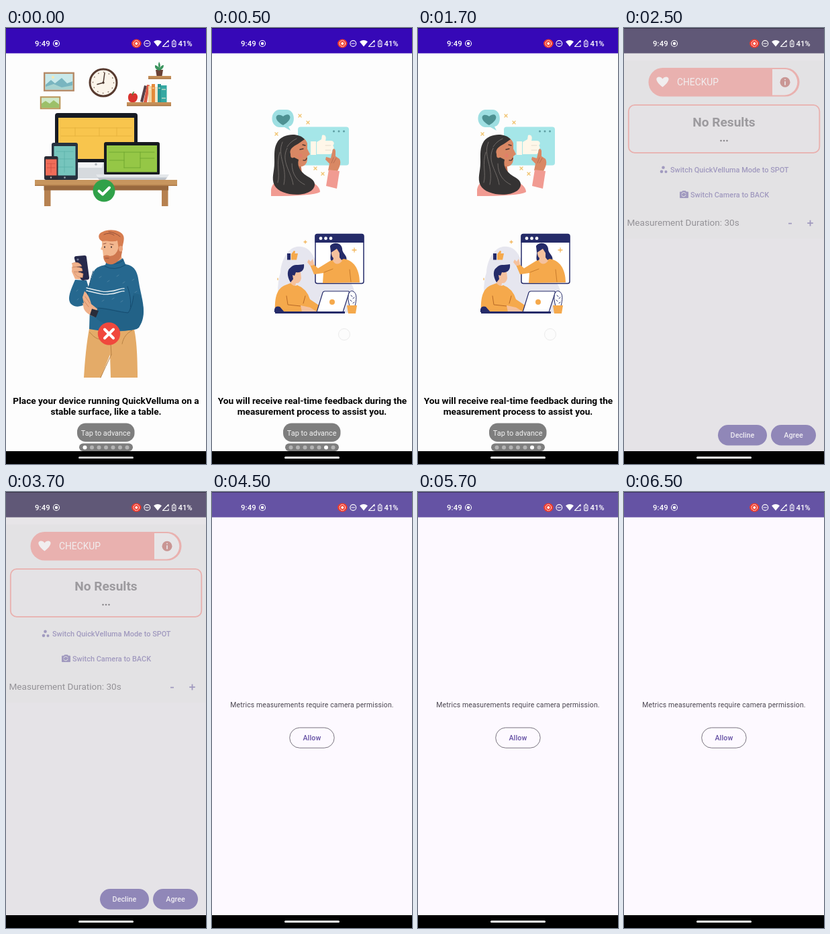
Recreate the animation shown at these times as an HTML page. Size 298 by 646 pixels, loop 8 s.

```html
<!DOCTYPE html>
<html lang="en">
<head>
<meta charset="utf-8">
<title>App walkthrough</title>
<style>
html, body { margin: 0; width: 100%; height: 100%; overflow: hidden; background: #000; }
svg { display: block; width: 100vw; height: 100vh; }
text { font-family: Roboto, Arial, sans-serif; }
.mid { text-anchor: middle; }
.bold { font-weight: 700; }
.medium { font-weight: 500; }
.caption text { font-size: 13.7px; font-weight: 700; text-anchor: middle; }
.line { fill: none; stroke-linecap: round; stroke-linejoin: round; }
</style>
</head>
<body>
<svg viewBox="0 0 298 646" preserveAspectRatio="none">
<rect width="298" height="646"/>
<rect id="page" y="37" width="298" height="590"/>

<g id="posture">
  <!-- wall -->
  <rect x="57.2" y="66.7" width="43.500" height="26" fill="#c9e9ea" stroke="#b58a67" stroke-width="2.400"/>
  <path d="M59 91V84l8-7 6 5 10-8 8 8 8-3v12z" fill="#79b5c0"/>
  <path d="M59 91v-4l12-4 12 5 16-3v6z" fill="#a8d3d0"/>
  <circle cx="70" cy="73" r="2" fill="#f7e8b0"/>
  <rect x="51.800" y="102.300" width="28.500" height="17" fill="#cfe8c8" stroke="#b99455" stroke-width="2"/>
  <path d="M53 118v-6l6-4 6 4 6-5 8 6v5z" fill="#9cc069"/>
  <circle cx="145" cy="81" r="20" fill="#fbf4ea" stroke="#573a2f" stroke-width="3"/>
  <circle cx="145" cy="81" r="15.500" class="line" stroke="#8a7568" stroke-width="1.500" stroke-dasharray=".5 7.615"/>
  <path d="M147 66.500L145 81l-9 2.500" class="line" stroke="#49352d" stroke-width="1.500"/>
  <circle cx="145" cy="81" r="1.700" fill="#49352d"/>
  <!-- shelves -->
  <path d="M212 71h34v4.500h-34zM180 110h66v5.500h-66z" fill="#c48f58"/>
  <path d="M212 74h34v1.500h-34zM180 114h66v1.500h-66z" fill="#a87443"/>
  <path d="M223 62h11l-1.500 9h-8z" fill="#6a4237"/>
  <path d="M228 63q-7-2-6-8 5 1 6 5-2-5 0-10 3 4 1 10 2-5 6-5 0 6-7 8" fill="#39935c"/>
  <path d="M188.500 98c4-3 8 0 7.500 5-.5 4-3 7-5 7h-4c-3 0-5-3-5-7 0-5 3-8 6.500-5" fill="#d9342f"/>
  <path d="M188.500 99q0-3 2-4" class="line" stroke="#4d7b35" stroke-width="1.500"/>
  <path d="M200 109l6-24 4 1-6 24z" fill="#574047"/>
  <path d="M205 110l5-26 4 .5-4 25.500z" fill="#dd5a43"/>
  <path d="M212 86h5v24h-5z" fill="#f0d6a5"/>
  <path d="M217 83h5v27h-5z" fill="#e58a3a"/>
  <path d="M222 87h4v23h-4z" fill="#f4e5c6"/>
  <path d="M226 83h5v27h-5z" fill="#2c9693"/>
  <path d="M231 85h8.500v25h-8.500z" fill="#35a8a2"/>
  <path d="M213 91h3M218 89h3M227 89h3M232 91h6M232 104h6" stroke="#fff2d8"/>
  <!-- monitor -->
  <path d="M107 196h40l2 27h-45z" fill="#d6dade"/>
  <path d="M108 199h37l-2 8h-35z" fill="#f2f3f5"/>
  <circle cx="134" cy="202" r="1.800" fill="#aeb4b9"/>
  <rect x="73" y="126" width="123" height="73" rx="4" fill="#171b24"/>
  <rect x="78" y="133" width="113" height="61" fill="#f8c54d"/>
  <path d="M82 148h105M103 148v12M139 148v12M165 148v12M82 160h105" class="line" stroke="#e3af3c" stroke-width=".8"/>
  <!-- tablet and phone -->
  <rect x="68" y="170" width="39" height="55" rx="3" fill="#263240"/>
  <rect x="71.500" y="175" width="32" height="43.500" fill="#76c5bd"/>
  <path d="M75 183h25M75 194h25M87 183v31M75 206h25" class="line" stroke="#5bb0a9" stroke-width=".8"/>
  <circle cx="87.500" cy="221.600" r="1.300" fill="#99a2a8"/>
  <rect x="57" y="190" width="20.500" height="35" rx="2.500" fill="#2b2b35"/>
  <rect x="59" y="194.500" width="16.500" height="24" fill="#f06d59"/>
  <path d="M61 201h12M61 207h12M67 201v13" class="line" stroke="#cf4f43" stroke-width=".8"/>
  <circle cx="67" cy="221.500" r="1.200" fill="#aaa"/>
  <!-- laptop -->
  <rect x="146" y="169" width="83" height="49" rx="3" fill="#171b20"/>
  <rect x="150" y="174" width="75" height="39.500" fill="#95c746"/>
  <path d="M154 184h67M176 184v23M200 184v23M154 196h22M200 193h21M176 207h24" class="line" stroke="#6ea52f" stroke-width=".9"/>
  <path d="M134 217h109l-5 8h-99z" fill="#e4e7ea"/>
  <path d="M136 221.500h104l-3 3.500h-98z" fill="#bec3c9"/>
  <!-- desk -->
  <path d="M57 234h9.500v30h-9.500zM232 234h9.500v30h-9.500z" fill="#b68150"/>
  <path d="M56.500 234h185.500v6.500h-185.500z" fill="#98683e"/>
  <path d="M43 225h212v9h-212z" fill="#c7955e"/>
  <path d="M43 232.500h212v1.500h-212z" fill="#ad7a48"/>
  <circle cx="146" cy="241" r="16.500" fill="#30a149"/>
  <path d="M138.500 241.500l5.500 5 10-10" class="line" stroke="#fff" stroke-width="4"/>

  <!-- person holding a phone -->
  <path d="M126 436h62c5 14 8 35 8 82h-40l-1-34-14 34h-25c2-32 5-60 10-82z" fill="#e4ab68"/>
  <path d="M157 484l-2-34M157 484c-6 12-11 23-16 34M125 451c5 6 9 9 14 10M188 448c-8 4-13 10-15 20" class="line" stroke="#b88144"/>
  <path d="M151 334h20l4 18-13 8-13-7z" fill="#e7a37c"/>
  <path d="M150 345q12 6 24-4l4 9c13 2 18 10 20 27 2 14 7 28 7 43 0 12-4 21-10 26q-34 7-71 0l1-32-6-6c-7 6-17 6-22 1-6-7-2-18 6-36l17 1 3 10 7-22q4-9 18-11z" fill="#26688f"/>
  <path d="M130 360c-4 12-8 28-11 48M123 384c-2 12-3 18-4 24M181 383c5 14 6 28 3 39M151 347q13 6 24-3M147 353q15 8 31-2" class="line" stroke="#164c70"/>
  <path d="M120 385c16 4 25 7 35 5 10 0 15-5 21-4M120 389c16 4 25 7 35 5 10 0 15-5 21-4" class="line" stroke="#e5edf0" stroke-width="1.400"/>
  <path d="M139 370l3-2M151 376l3-2M165 368l3-2M174 378l3-2M143 405l3-2M158 402l3-2M171 406l3-2M188 374l3-2M192 392l3-2M188 411l3-2M105 390l2-2M106 403l2-2" class="line" stroke="#5b8daa" stroke-width=".7"/>
  <path d="M137 414c16 0 31 6 45 7 5-8 7-17 8-28l10 2c7 20 6 35-2 49-15 9-42 2-63-13z" fill="#226287"/>
  <path d="M137 415c17 1 31 6 45 7 5-7 7-16 8-25" class="line" stroke="#164c70"/>
  <path d="M117 390c5 4 8 11 10 19l9 7-3 12c-8-2-14-6-17-12l-2-9 2 1-2-9z" fill="#efb08a"/>
  <path d="M116 404l7 9M118 398l7 10" class="line" stroke="#c67e59" stroke-width=".8"/>
  <path d="M128 416l10 3-4 10-9-4z" fill="#292c3a"/>
  <path d="M99 349c6-2 13 0 20 5l4 10-3 9-17-1-5-11z" fill="#f0b28c"/>
  <path d="M105 338l12-1q3 0 3 3l4 30q0 3-3 3l-6 1q-3 0-4-3l-9-29q-1-4 3-4z" fill="#26294b"/>
  <circle cx="107" cy="343" r="1.600" fill="#777e9a"/>
  <path d="M98 349q8-4 13 1l2 3-13 1M98 355q10-2 15 1l1 4-13 1M101 362q9-1 14 2l-1 6q-8 0-12-7" fill="#f0b28c" stroke="#c98662" stroke-width=".6"/>
  <path d="M143 314c4-5 23-5 28 2l1 16q-4 10-11 14l-8 2q-8-1-8-10l-1-9-3-1 2-5z" fill="#f2b78f"/>
  <path d="M168 325l5 1q1 13-7 20-5 5-12 4-8-1-9-12 5-3 10 0 9 0 13-13z" fill="#cf784f"/>
  <path d="M143 316c-7-4-6-12 1-14 9-5 28-3 31 6 2 5-1 12-2 20h-5l-2-13c-7 3-16-1-23 1z" fill="#d77d50"/>
  <ellipse cx="171" cy="327" rx="3" ry="4.300" fill="#eba47d"/>
  <path d="M145 320l4-1M155 320l5 1M148 341h5M146 306q8-4 15 1M153 302q10 1 17 7" class="line" stroke="#8c4b38" stroke-width=".9"/>
  <path d="M147 324v1M157 324v1" class="line" stroke="#392d31" stroke-width="1.700"/>
  <circle cx="153.500" cy="453" r="16.700" fill="#f0483d"/>
  <path d="M147 446.500l13 13m0-13l-13 13" class="line" stroke="#fff" stroke-width="4"/>
  <g class="caption"><text x="149" y="556.700">Place your device running QuickVelluma on a</text><text x="149" y="572.700">stable surface, like a table.</text></g>
</g>

<g id="feedback">
  <!-- gesture card -->
  <rect x="128" y="146.500" width="76" height="57" rx="4" fill="#a5e6e8"/>
  <g fill="#5f9fa4"><circle cx="181.500" cy="153" r="1.500"/><circle cx="189" cy="153" r="1.500"/><circle cx="196.500" cy="153" r="1.500"/></g>
  <path d="M100 121h11c14 0 14 24 3 25l3 6-9-5h-8c-14-2-14-24 0-26z" fill="#9edfe2"/>
  <path d="M106 144c-18-10-9-20 0-13 9-8 18 3 0 13z" fill="#4d9192"/>
  <path d="M88 249v-10c2-10 10-14 20-16h30c14 5 23 12 23 20q-11 6-73 6z" fill="#f19b92"/>
  <path d="M119 198h13l3 28q-10 9-20 0z" fill="#bd6b4e"/>
  <path d="M116 168c9-10 23-8 26 3v8l4 8-4 3c1 11-4 16-12 15-9 0-14-8-14-22z" fill="#d98864"/>
  <path d="M138 165c-10-11-32-8-40 3-6 9-5 19-5 31 0 15-5 23 0 34 8 15 41 18 55 8 8-7 6-14-2-19-13-7-20-16-17-27l-10-5c-6-8 0-13 5-16 6-3 9-6 14-9z" fill="#353333"/>
  <path d="M105 169c-9 21 8 35 2 63M112 178c-10 20 6 34 9 54M101 184c-6 18 1 31-3 45M119 201c0 17 9 26 19 31M126 164q-9 4-14 12" class="line" stroke="#77716e" stroke-width=".9"/>
  <path d="M131 180l5-1M139 174l-4-1M136 196q4 1 5-3" class="line" stroke="#493530" stroke-width="1.300"/>
  <circle cx="132" cy="189" r="2.700" fill="#e17f69"/>
  <ellipse cx="120" cy="188" rx="3" ry="4.500" fill="#d98864"/>
  <path d="M147 168h8v20h-8zM156 169l7-4 1-6c5-2 7 3 5 8h8c5 0 6 5 3 7 3 3 1 6-1 7 1 4-1 6-4 6h-19z" fill="#fff7e9"/>
  <path d="M169 174h8M169 181h8" class="line" stroke="#e4dbcb"/>
  <path d="M173 211l2-10-6-6 1-4 7 2 3-13q3-3 4 2v8l6 4c3 6 0 12-3 18z" fill="#d98864"/>
  <path d="M181 192l-3 8M185 193l-4 7" class="line" stroke="#a96249" stroke-width=".7"/>
  <path d="M174 210l16 2-4 26-16-4z" fill="#f19b92"/>
  <path d="M129 128l4 4m0-4l-4 4M141 138l4 4m0-4l-4 4M94 155l4 4m0-4l-4 4M152 206l4 4m0-4l-4 4M163 214l4 4m0-4l-4 4" class="line" stroke="#f1c472" stroke-width="1.400"/>

  <!-- video call -->
  <path d="M106 422c-9-18-10-42-4-60 1-18 12-41 31-38 20 3 16 23 34 31 21 9 45 17 45 38 0 15-1 24-5 29z" fill="#e6e6ef"/>
  <rect x="154" y="305.500" width="72" height="73" rx="3" fill="#fff" stroke="#252b69" stroke-width="1.500"/>
  <path d="M153.300 318v-9q0-4 4-4h65q4 0 4 4v9z" fill="#252b69"/>
  <g fill="#fff"><circle cx="162" cy="311.700" r="2.400"/><circle cx="169.500" cy="311.700" r="2.400"/><circle cx="177" cy="311.700" r="2.400"/></g>
  <path d="M176 323c5-7 17-5 18 4 0 8 9 9 6 20-3 8-17 6-21 1-6-7 1-15-3-25z" fill="#252b69"/>
  <path d="M165 378l1-15-14 2-6-14 4-2 8 7 18-11 7-2 6 3 7-4c15 2 24 15 24 35z" fill="#f5a94c"/>
  <path d="M178 328q7-3 12 1v11l4 5q-8 9-14 0l1-4q-4-3-3-13z" fill="#f5c19d"/>
  <path d="M176 323q10-7 17 4l-2 8-5-8-6 4-3 2z" fill="#252b69"/>
  <path d="M167 362l13-5M205 358l2 18" class="line" stroke="#c97c2c"/>
  <path d="M146 352l-4-5 2-4 3 3 3-4 2 7-2 3z" fill="#f5c19d"/>
  <path d="M212 326v6m-3-3h6M139 315v4m-2-2h4M98 371v2" class="line" stroke="#f2b65c" stroke-width="1.300"/>
  <path d="M112 334h5v9.500h-5z" fill="#252b69"/>
  <path d="M118 335l4-5c3 0 2 3 1 4h5l-2 9.500h-8z" fill="#f5a94c"/>
  <path d="M118 361h14l1 10q-2 8-8 7l-1 5-7-3z" fill="#f5c19d"/>
  <path d="M117 377c-6-10-5-19 0-22 5-6 11-3 20-5 1 8-3 13-12 12l-2 5-3-1 1 6z" fill="#252b69"/>
  <path d="M94 421c-1-23 3-35 15-40l8-3q5 6 10 3 14 5 19 21l15 10 1 9z" fill="#f5a94c"/>
  <path d="M111 397l2 13 19 2M139 397l-3 11" class="line" stroke="#b86927"/>
  <path d="M93 421c-1-7 3-10 8-8l7 8z" fill="#252b69"/>
  <path d="M156 421l9-29q1-2 3-2h35q2 0 1 3l-9 28z" fill="#fff" stroke="#252b69" stroke-width="1.200"/>
  <circle cx="179" cy="406" r="4" fill="#f5a94c"/>
  <path d="M132 411l14 3 10 6-22 1z" fill="#f5c19d"/>
  <path d="M94 420h104v3h-104z" fill="#252b69"/>
  <path d="M205 412c-5-17 0-24 5-22 7 3 5 14 3 22z" fill="#fff" stroke="#252b69"/>
  <path d="M207 396l2 2M212 399l-2 2M206 403l2 2M212 406l-2 2" class="line" stroke="#252b69"/>
  <path d="M201 411h15l-2 12h-11z" fill="#f5a94c"/>
  <circle cx="197" cy="454" r="8.500" fill="#fcfcfc" stroke="#ebebeb"/>
  <g class="caption"><text x="149.500" y="556.700">You will receive real-time feedback during the</text><text x="149" y="572.700">measurement process to assist you.</text></g>
</g>

<g id="tour">
  <rect x="106" y="585.500" width="85.500" height="27.500" rx="12.500" fill="#7e7e7e"/>
  <text class="mid" x="148.700" y="603.500" font-size="10.900" fill="#f4f4f4">Tap to advance</text>
  <rect x="109" y="615.500" width="80" height="11.500" rx="5.700" fill="#7e7e7e"/>
  <g id="dots"></g>
</g>

<g id="checkup">
  <path d="M0 37h298v275h-298z" fill="#e3e2e4"/>
  <path d="M0 37h298v11h-298z" fill="#e7e5e8"/>
  <rect x="36.500" y="59" width="225" height="42.500" rx="21.200" fill="#e9b1af"/>
  <path d="M221 61h18a19.200 19.200 0 0 1 0 38.500h-18z" fill="#e7e5e7"/>
  <path d="M57.500 87.500C39 73 54 69 57.500 75.500C61 69 76 73 57.500 87.500z" fill="#f1eeef"/>
  <text x="79" y="85.200" font-size="13.800" fill="#f1eeef">CHECKUP</text>
  <circle cx="240" cy="80.300" r="7.500" fill="#c99694"/>
  <path d="M240 79.500v4.500M240 76.300v.2" class="line" stroke="#e9e6e8" stroke-width="1.700"/>
  <rect x="6.800" y="114.200" width="284.500" height="70.600" rx="9" fill="#e4e2e5" stroke="#e9b0ae" stroke-width="1.800"/>
  <text class="mid bold" x="149" y="146" font-size="19.100" fill="#9c9a9e">No Results</text>
  <g fill="#8b898d"><circle cx="144.500" cy="167" r="1.300"/><circle cx="149" cy="167" r="1.300"/><circle cx="153.500" cy="167" r="1.300"/></g>
  <g fill="#a19abf">
    <circle cx="58.500" cy="206.800" r="2.300"/><circle cx="56" cy="212.800" r="2.300"/><circle cx="62.500" cy="213" r="2"/>
    <path d="M84 242.500h2l1.500-1.500h4l1.500 1.500h2q1 0 1 1v7.500q0 1-1 1h-11q-1 0-1-1v-7.500q0-1 1-1z"/>
    <text class="medium" x="69" y="214.300" font-size="10.950">Switch QuickVelluma Mode to SPOT</text>
    <text class="medium" x="99" y="251" font-size="10.950">Switch Camera to BACK</text>
    <path d="M245 288.800h5v1.700h-5zM273.200 288.200h3.400v-3.400h1.800v3.400h3.400v1.800h-3.400v3.400h-1.800v-3.400h-3.400z"/>
  </g>
  <path d="M86 246a3.200 3.200 0 0 1 6-.5m0 2a3.200 3.200 0 0 1-6 .5" class="line" stroke="#e3e2e4"/>
  <text x="4.500" y="293" font-size="13.600" fill="#949297">Measurement Duration: 30s</text>
  <g fill="#9087b8"><rect x="140" y="588" width="73" height="30.500" rx="15.200"/><rect x="219" y="588" width="67" height="30.500" rx="15.200"/></g>
  <g class="mid medium" font-size="10.800" fill="#eeebf2"><text x="176.500" y="607.200">Decline</text><text x="252.500" y="607.200">Agree</text></g>
</g>

<g id="permission">
  <text class="mid" x="149" y="318.500" font-size="10.400" letter-spacing=".17" fill="#49454f">Metrics measurements require camera permission.</text>
  <rect x="115.700" y="349.200" width="66.500" height="30" rx="15" fill="none" stroke="#7b7681"/>
  <text class="mid medium" x="149" y="368" font-size="10.600" letter-spacing=".15" fill="#6550a4">Allow</text>
</g>

<rect id="bar" y=".4" width="298" height="37.100"/>
<g fill="#fff">
  <g class="medium" font-size="11.300"><text x="43" y="27" letter-spacing=".15">9:49</text><text x="256.500" y="27">41%</text></g>
  <circle cx="75" cy="23" r="2.200"/>
  <g class="line" stroke="#fff" stroke-width="1.100">
    <circle cx="75" cy="23" r="4.500"/><circle cx="210.300" cy="23" r="4.400"/><path d="M208 23h4.600M242 25v2.500h-8.500l8.500-9v2.500"/>
    <rect x="247.700" y="19.300" width="5.200" height="8.300" rx="1"/><path d="M249.500 18h1.600M250.300 21.500v3.600"/>
  </g>
  <path d="M220 20.300q6-4.600 12 0l-6 7.200z"/>
  <ellipse cx="194.300" cy="23" rx="7.200" ry="6.500" fill="#ef3b2d"/>
  <circle cx="194.300" cy="23" r="4.300" class="line" stroke="#fff" stroke-width=".9" stroke-dasharray="2 1.377"/>
  <circle cx="194.300" cy="23" r="2"/>
</g>
<rect id="handle" x="108" y="635" width="82" height="3" rx="1.500"/>
</svg>
<script>
const LOOP = 8000;
const scenes = [
  { at: 0, show: ['posture', 'tour'], page: '#fdfdfd', bar: '#3608b7', handle: '#cfcfcf', dot: 0 },
  { at: 500, show: ['feedback', 'tour'], page: '#fdfdfd', bar: '#3608b7', handle: '#fff', dot: 5 },
  { at: 2500, show: ['checkup'], page: '#e5e3e7', bar: '#605877', handle: '#fff' },
  { at: 4500, show: ['permission'], page: '#fdf9ff', bar: '#6553a4', handle: '#fff' }
];
const layers = ['posture', 'feedback', 'tour', 'checkup', 'permission'];
const el = id => document.getElementById(id);

for (let i = 0; i < 7; i++) {
  const dot = document.createElementNS('http://www.w3.org/2000/svg', 'circle');
  dot.setAttribute('cx', 117.5 + i * 10.5);
  dot.setAttribute('cy', 621.5);
  dot.setAttribute('r', 3);
  el('dots').append(dot);
}

let current;
function render(time) {
  const scene = scenes.findLast(s => s.at <= time % LOOP);
  if (scene === current) return;
  current = scene;
  for (const id of layers) el(id).style.display = scene.show.includes(id) ? '' : 'none';
  for (const id of ['page', 'bar', 'handle']) el(id).setAttribute('fill', scene[id]);
  [...el('dots').children].forEach((dot, i) => dot.setAttribute('fill', i === scene.dot ? '#fff' : '#b3b3b3'));
}

const start = performance.now();
function tick() {
  render(performance.now() - start);
  requestAnimationFrame(tick);
}
tick();
</script>
</body>
</html>
```
